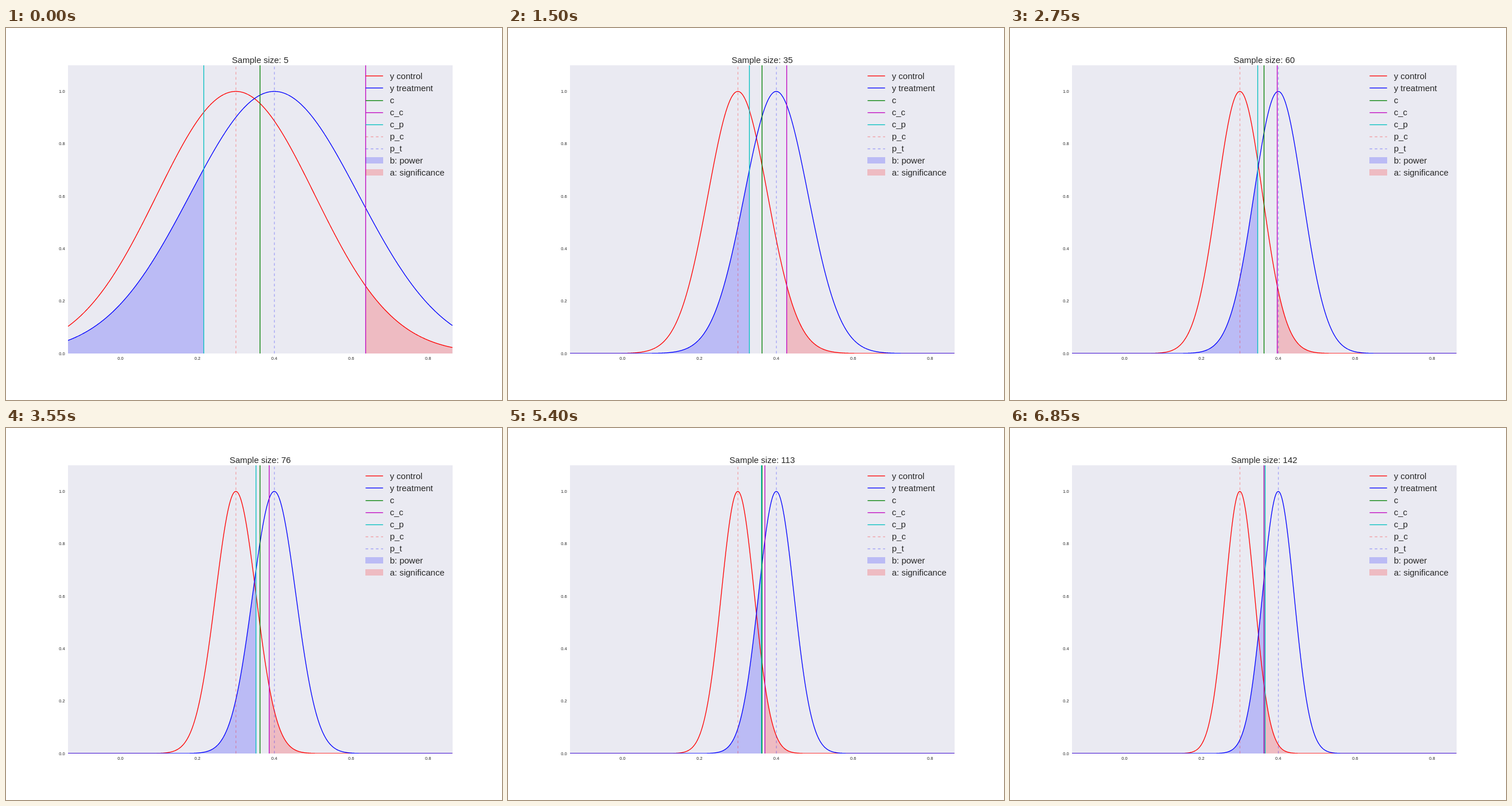
An HTML page with a canvas that plays this animation: 864 by 648 pixels, repeating every 6900 ms.

```html
<!DOCTYPE html>
<html lang="en">
<head>
<meta charset="utf-8">
<title>Sample size</title>
<style>
html, body { margin: 0; width: 100%; height: 100%; overflow: hidden; background: #fff; }
canvas { display: block; }
</style>
</head>
<body>
<canvas id="stage" width="864" height="648"></canvas>
<script>
const ctx = document.getElementById('stage').getContext('2d');
const FONT = '"Liberation Sans", Arial, sans-serif';
const STEP = 50, STEPS = 138, FIRST = 5;
const LEFT = 108, RIGHT = 777.6, TOP = 64.8, BOTTOM = 567;
const P_C = 0.3, P_T = 0.4, Z_A = 1.645, Z_B = 0.84, C = 0.3634;
const RED = '#f00', BLUE = '#00f', GREEN = '#008000', MAGENTA = '#bf00bf', CYAN = '#00bfbf';
const PALE_RED = 'rgba(255,0,0,.3)', PALE_BLUE = 'rgba(0,0,255,.3)';
const FILL_RED = 'rgba(255,0,0,.2)', FILL_BLUE = 'rgba(0,0,255,.2)';
const DASH = [4.5, 4.5];
const LEGEND = [
  ['y control', RED], ['y treatment', BLUE], ['c', GREEN], ['c_c', MAGENTA], ['c_p', CYAN],
  ['p_c', PALE_RED, 'dash'], ['p_t', PALE_BLUE, 'dash'],
  ['b: power', FILL_BLUE, 'patch'], ['a: significance', FILL_RED, 'patch']
];

const px = v => (LEFT + RIGHT) / 2 + (v - C) * (RIGHT - LEFT);
const py = v => BOTTOM - v * (BOTTOM - TOP) / 1.1;
const snap = v => Math.floor(v) + 0.5;
const sigma = (p, n) => Math.sqrt(p * (1 - p) / n);

function text(str, x, y, size, align) {
  ctx.font = size + 'px ' + FONT;
  ctx.textAlign = align;
  ctx.fillStyle = '#262626';
  ctx.fillText(str, x, y);
}

function line(x0, y0, x1, y1, color, dashed) {
  ctx.setLineDash(dashed ? DASH : []);
  ctx.strokeStyle = color;
  ctx.beginPath();
  ctx.moveTo(x0, y0);
  ctx.lineTo(x1, y1);
  ctx.stroke();
  ctx.setLineDash([]);
}

function vline(v, color, dashed) {
  const x = snap(px(v));
  line(x, BOTTOM, x, TOP, color, dashed);
}

function bell(p, s, from, to) {
  const steps = Math.ceil((to - from) * 2);
  ctx.beginPath();
  for (let i = 0; i <= steps; i++) {
    const x = from + (to - from) * i / steps;
    const z = (x - px(p)) / (RIGHT - LEFT) / s;
    ctx.lineTo(x, py(Math.exp(-z * z / 2)));
  }
}

function curve(p, s, color) {
  bell(p, s, LEFT, RIGHT);
  ctx.strokeStyle = color;
  ctx.stroke();
}

function area(p, s, from, to, color) {
  bell(p, s, from, to);
  ctx.lineTo(to, BOTTOM);
  ctx.lineTo(from, BOTTOM);
  ctx.fillStyle = color;
  ctx.fill();
}

function legend() {
  LEGEND.forEach(([label, color, kind], i) => {
    const base = 89 + 21.05 * i;
    if (kind === 'patch') {
      ctx.fillStyle = color;
      ctx.fillRect(626, Math.round(base - 10.9), 31, 11);
    } else {
      const y = snap(83.9 + 21.07 * i);
      line(626.4, y, 656.8, y, color, kind === 'dash');
    }
    text(label, 668.7, base, 15, 'left');
  });
}

function draw(n) {
  const sc = sigma(P_C, n), st = sigma(P_T, n);
  const cc = P_C + Z_A * sc, cp = P_T - Z_B * st;

  ctx.fillStyle = '#fff';
  ctx.fillRect(0, 0, 864, 648);
  ctx.fillStyle = '#eaeaf2';
  ctx.fillRect(LEFT, 65, 670, 502);

  ctx.save();
  ctx.beginPath();
  ctx.rect(LEFT, 65, 670, 502);
  ctx.clip();
  ctx.lineWidth = 1.3125;
  ctx.lineJoin = 'round';
  area(P_T, st, LEFT, px(cp), FILL_BLUE);
  area(P_C, sc, px(cc), RIGHT, FILL_RED);
  curve(P_C, sc, RED);
  curve(P_T, st, BLUE);
  vline(C, GREEN);
  vline(cc, MAGENTA);
  vline(cp, CYAN);
  vline(P_C, PALE_RED, true);
  vline(P_T, PALE_BLUE, true);
  legend();
  ctx.restore();

  for (let i = 0; i <= 5; i++) {
    const v = i / 5, label = v.toFixed(1);
    if (i < 5) text(label, px(v), 578, 7.5, 'center');
    text(label, 102.6, py(v) + 2.6, 7.5, 'right');
  }
  text('Sample size: ' + n, 442.8, 61, 15, 'center');
}

const start = performance.now();
let shown = 0;
function tick() {
  const t = Math.max(0, performance.now() - start);
  const n = FIRST + Math.floor(t / STEP) % STEPS;
  if (n !== shown) draw(shown = n);
  requestAnimationFrame(tick);
}
tick();
</script>
</body>
</html>
```
